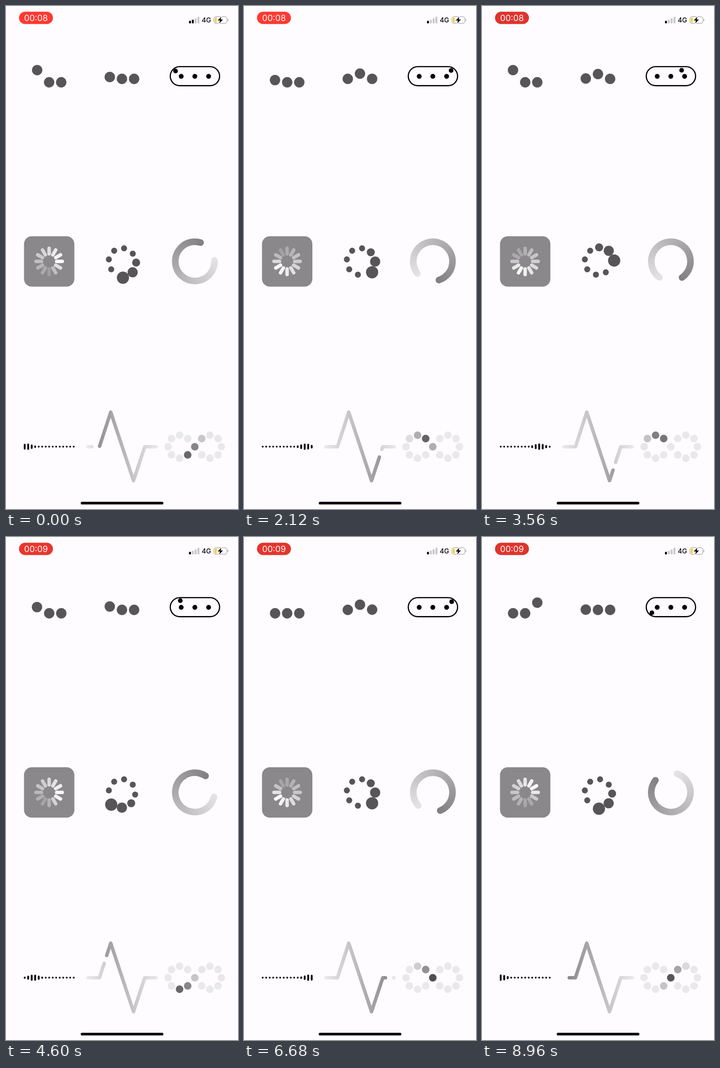
Recreate the animation shown at these times as an HTML page with a canvas. Size 509 by 1101 pixels, loop 9000 ms.

```html
<!DOCTYPE html>
<html lang="en">
<head>
<meta charset="utf-8">
<title>Loaders</title>
<style>
  html, body { margin: 0; width: 100%; height: 100%; overflow: hidden; background: #fefcff; }
  svg, canvas { position: absolute; left: 0; top: 0; width: 509px; height: 1101px; display: block; }
  text { font-family: Inter, Roboto, sans-serif; }
</style>
</head>
<body>
<svg viewBox="0 0 509 1101">
  <rect id="pill" x="28.5" y="12.5" width="74.5" height="27" rx="13.5"/>
  <text id="clock" x="65.7" y="32.8" font-size="18.6" fill="#fff" text-anchor="middle">00:08</text>
  <g id="bars" fill="#c9c7ca">
    <rect x="401.5" y="32.5" width="4.2" height="5.5" rx="1" fill="#000"/>
    <rect id="bar2" x="407.7" y="30" width="4.2" height="8" rx="1"/>
    <rect x="413.9" y="27" width="4.2" height="11" rx="1"/>
    <rect x="420.1" y="23.5" width="4.2" height="14.5" rx="1"/>
  </g>
  <text x="429.5" y="36.2" font-size="14.6" font-weight="500">4G</text>
  <rect x="456.2" y="23.3" width="28.6" height="14.6" rx="4.6" fill="none" stroke="#a3a1a4" stroke-width="1.2"/>
  <path d="M486.3 28v5.2q1.6-.7 1.6-2.6t-1.6-2.6z" fill="#a3a1a4"/>
  <path d="M462.2 25.3v10.6h-1.4q-2.5 0-2.5-2.6v-5.4q0-2.6 2.5-2.6z" fill="#ffcc0a"/>
  <path d="M472.6 23.4L464.4 31.8h5l-1.7 6.4 8.3-8.6h-5z" stroke="#fefcff" stroke-width="2.4" paint-order="stroke"/>
  <rect x="39.5" y="504" width="110.5" height="110.3" rx="17" fill="#8a888a"/>
  <rect x="360.4" y="132.8" width="108.2" height="41.6" rx="20.8" fill="none" stroke="#000" stroke-width="2.6"/>
  <g>
    <circle cx="384.4" cy="153.9" r="5.3"/>
    <circle cx="414.3" cy="153.9" r="5.3"/>
    <circle cx="444.5" cy="153.9" r="5.3"/>
  </g>
  <rect x="164" y="1085.3" width="181.3" height="5.8" rx="2.9"/>
</svg>
<canvas id="stage"></canvas>
<script>
const LOOP = 9000, STEP = 40, TAU = Math.PI * 2;
const GREY = '#575558', LIGHT = [234, 233, 235], DARK = [130, 128, 131];
const canvas = document.getElementById('stage');
const ctx = canvas.getContext('2d');
const pill = document.getElementById('pill');
const clock = document.getElementById('clock');
const bar2 = document.getElementById('bar2');
const ratio = Math.max(1, window.devicePixelRatio || 1);
canvas.width = 509 * ratio;
canvas.height = 1101 * ratio;

const mod = (a, n) => ((a % n) + n) % n;
const clamp = v => Math.min(1, Math.max(0, v));
const ease = v => .5 - .5 * Math.cos(Math.PI * clamp(v));
const span = (v, a, b) => ease((v - a) / (b - a));
const mix = (a, b, k) => `rgb(${a.map((v, i) => Math.round(v + (b[i] - v) * k))})`;
const rad = deg => deg * Math.PI / 180;
// triangle wave 0..1..0
const sweep = t => {
  const p = mod(t + 35, 1500) / 750;
  return p < 1 ? p : 2 - p;
};

function dot(x, y, r, fill) {
  ctx.fillStyle = fill;
  ctx.beginPath();
  ctx.arc(x, y, r, 0, TAU);
  ctx.fill();
}

function line(x1, y1, x2, y2) {
  ctx.beginPath();
  ctx.moveTo(x1, y1);
  ctx.lineTo(x2, y2);
  ctx.stroke();
}

function status(t) {
  const p = mod(t, 2000) / 2000;
  const bright = p < .5 ? 1 - span(p, .15, .4) : span(p, .88, 1);
  pill.setAttribute('fill', mix([222, 52, 45], [255, 57, 49], bright));
  clock.textContent = t < 4600 ? '00:08' : '00:09';
  bar2.setAttribute('fill', t < 640 ? '#000' : '#c9c7ca');
}

// first ball rises, travels over the others and drops at the end
function leapfrog(t) {
  const p = mod(t / 1210 + .02, 1);
  const move = span(p, 0, .38);
  const up = p < .5 ? 1 - span(p, .37, .61) : span(p, .71, .93);
  const done = p > .66 ? 0 : move;
  dot(68 + 53.3 * done, 167 - 26.7 * up, 11.4, GREY);
  dot(94.8 - 26.6 * done, 167, 11.4, GREY);
  dot(121.3 - 26.6 * done, 167, 11.4, GREY);
}

function bounce(t) {
  [-385, 0, 360].forEach((peak, i) => {
    const d = Math.abs(mod(t - 2120 - peak + 755, 1510) - 755);
    dot(227.7 + 26.7 * i, 159.5 - 11.5 * (1 - ease(d / 380)), 11.4, GREY);
  });
}

// ball weaving around three fixed dots, there and back
function weave(t) {
  const u = mod(.57 + t / 126.5, 12);
  const dir = u > 6 ? -1 : 1;
  const v = Math.min(u > 6 ? 12 - u : u, 5.9999);
  const k = Math.floor(v / 2), a = (v - 2 * k) * Math.PI / 2;
  const rx = v < 1 || v > 5 ? 20 : 15;
  const side = dir * (k % 2 ? -1 : 1);
  dot(384.5 + 30 * k - rx * Math.cos(a), 154 - side * 14.8 * Math.sin(a), 5.1, '#000');
}

function petals(t) {
  const head = 3 + t / 1508 * 12;
  ctx.lineWidth = 7.6;
  for (let i = 0; i < 12; i++) {
    const d = mod(head - i, 12);
    const k = d < 9 ? 1 - d / 9 : (d - 9) / 3;
    const c = Math.sin(rad(i * 30)), s = -Math.cos(rad(i * 30));
    ctx.strokeStyle = `rgba(255,255,255,${.2 + .8 * k})`;
    line(94.6 + 16.6 * c, 559 + 16.6 * s, 94.6 + 28.8 * c, 559 + 28.8 * s);
  }
}

function ringDots(t) {
  const head = 4 + Math.floor(t / 93.3 + .4);
  const sizes = [13.4, 11.1, 8.8];
  for (let i = 0; i < 8; i++) {
    const r = sizes[mod(head - i, 8)] || 6.6;
    const at = rad(i * 45 + 9), out = rad(i * 45 - 45), push = (r - 6.6) * 1.38;
    dot(254.5 + 29.2 * Math.sin(at) + push * Math.sin(out),
        559.2 - 29.2 * Math.cos(at) - push * Math.cos(out), r, GREY);
  }
}

function arc(t) {
  let a = 17 + .2383 * Math.min(t, 5640);
  a += .228 * clamp((t - 5640) / 2080) * 2080;
  a += .22 * Math.max(0, t - 7720);
  const grad = ctx.createConicGradient(rad(a + 35 - 90), 414.4, 559);
  grad.addColorStop(.09, mix(LIGHT, DARK, .07));
  grad.addColorStop(.91, mix(LIGHT, DARK, 1));
  ctx.strokeStyle = grad;
  ctx.lineWidth = 14.4;
  ctx.beginPath();
  ctx.arc(414.4, 559, 43, rad(a + 70 - 90), rad(a + 360 - 90));
  ctx.stroke();
}

function equalizer(t) {
  const peak = 14 * sweep(t);
  ctx.strokeStyle = '#000';
  ctx.lineWidth = 4;
  for (let i = 0; i < 15; i++) {
    const half = 5 * (1 - ease(Math.abs(i - peak) / 3));
    const x = 41 + 7.68 * i;
    line(x, 964.6 - half - .01, x, 964.6 + half + .01);
  }
}

const BEAT = [[180, 964.7], [205, 964.7], [229.8, 889], [279.8, 1039], [304.5, 964.7], [329.5, 964.7]];
const lengths = BEAT.slice(1).map((p, i) => Math.hypot(p[0] - BEAT[i][0], p[1] - BEAT[i][1]));
const total = lengths.reduce((a, b) => a + b);

function trace(from, to, c1, c2) {
  if (to - from < .5) return;
  const grad = ctx.createLinearGradient(177, 0, 333, 0);
  grad.addColorStop(0, mix(c1, c1, 0));
  grad.addColorStop(1, mix(c2, c2, 0));
  ctx.strokeStyle = grad;
  ctx.beginPath();
  let s = 0, open = false;
  lengths.forEach((len, i) => {
    const a = Math.max(from, s), b = Math.min(to, s + len);
    if (b > a) {
      const [x, y] = BEAT[i], [x2, y2] = BEAT[i + 1];
      const at = q => [x + (x2 - x) * (q - s) / len, y + (y2 - y) * (q - s) / len];
      if (!open) ctx.moveTo(...at(a));
      open = true;
      ctx.lineTo(...at(b));
    }
    s += len;
  });
  ctx.stroke();
}

function heartbeat(t) {
  const gap = sweep(t) * total * 1.02;
  ctx.lineWidth = 7.6;
  trace(0, gap - 9, LIGHT, DARK);
  trace(Math.max(0, gap + 9), total, DARK, LIGHT);
}

// figure eight, walked from the upper right through the centre
const EIGHT = Array.from({ length: 16 }, (_, i) => {
  if (i % 8 === 2) return [414.2, 964.8];
  const left = i > 2 && i < 10;
  const a = left ? rad(45 + (i - 3) * 45) : rad(-90 - mod(i, 16) * 45);
  return [(left ? 380.8 : 447.3) + 25.2 * Math.cos(a), 964.7 + 25.2 * Math.sin(a)];
});

function infinity(t) {
  const head = 2.77 + t / 1502 * 16;
  const glow = EIGHT.map((_, i) => {
    const d = mod(head - i, 16);
    return d > 15 ? d - 15 : Math.pow(clamp(1 - d / 3), 1.75);
  });
  glow[2] = Math.max(glow[2], glow[10]);
  EIGHT.forEach(([x, y], i) => {
    if (i !== 10) dot(x, y, 8.3, mix([233, 232, 234], [67, 65, 68], glow[i]));
  });
}

const parts = [status, leapfrog, bounce, weave, petals, ringDots, arc, equalizer, heartbeat, infinity];

function frame() {
  const t = Math.floor((performance.now() - start) % LOOP / STEP) * STEP;
  ctx.setTransform(ratio, 0, 0, ratio, 0, 0);
  ctx.clearRect(0, 0, 509, 1101);
  ctx.lineCap = ctx.lineJoin = 'round';
  parts.forEach(draw => draw(t));
  requestAnimationFrame(frame);
}

const start = performance.now();
frame();
</script>
</body>
</html>
```
